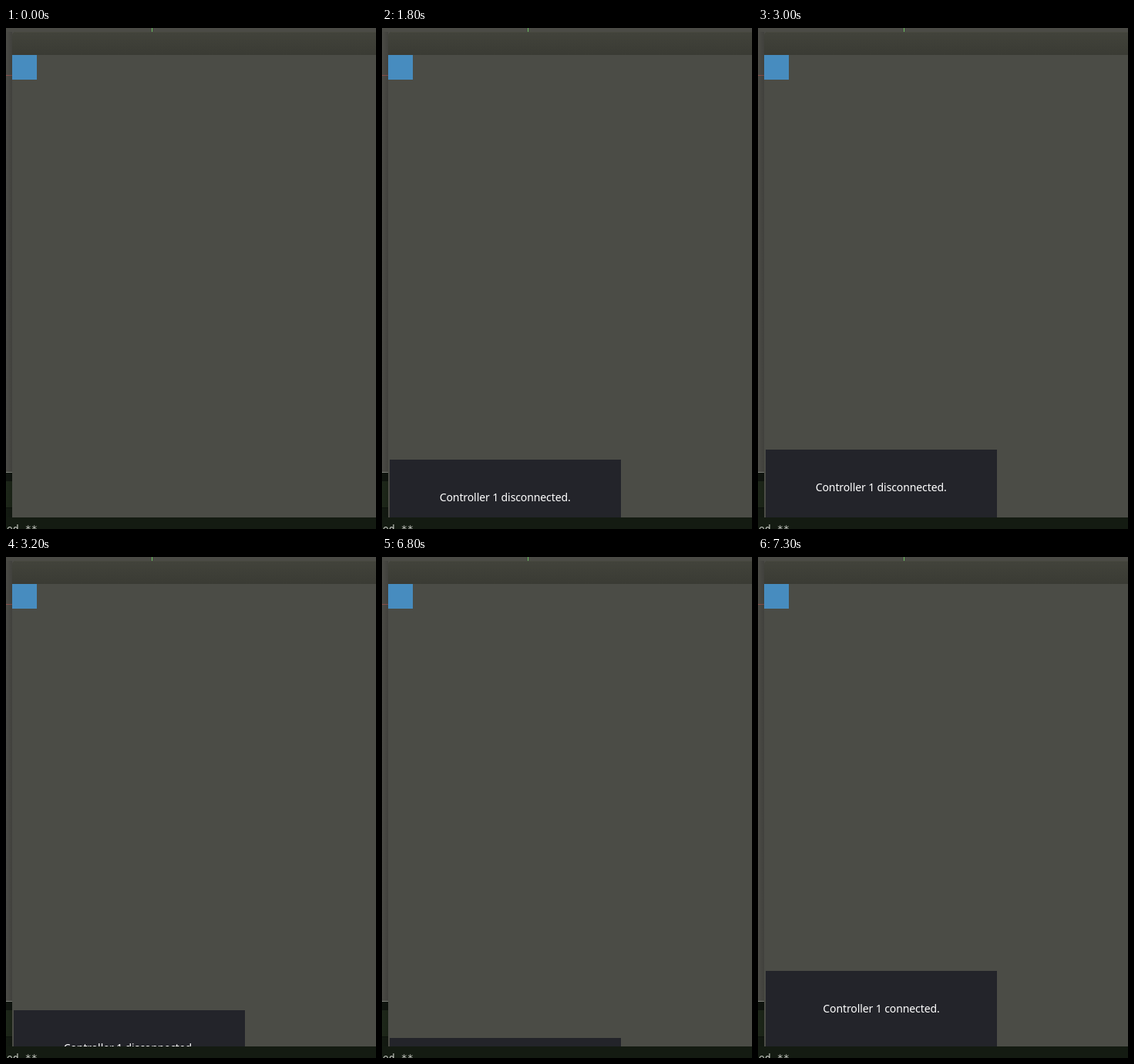
Write an HTML page that moves like this. It is 480 px wide and 650 px high and loops after 8000 ms.

```html
<!DOCTYPE html>
<html lang="en">
<head>
<meta charset="utf-8">
<title>Controller notification</title>
<style>
  html, body { margin: 0; width: 100%; height: 100%; overflow: hidden; background: #4b4b46; }
  svg { display: block; }
  .toast { animation: slide 8s step-end infinite; }
  .toast text { font: 14px "Noto Sans", "Open Sans", sans-serif; letter-spacing: -0.1px; fill: #fff; text-anchor: middle; }
  .lost { animation: lost 8s step-end infinite; }
  .found { animation: found 8s step-end infinite; }
  .log { font: 13.3px "DejaVu Sans Mono", monospace; fill: #c4c6c0; white-space: pre; }

  /* Moves about 20px every 100ms, in hard steps */
  @keyframes slide {
    0% { transform: translateY(100px); }
    18.75% { transform: translateY(85px); }
    20% { transform: translateY(65px); }
    21.25% { transform: translateY(44px); }
    22.5% { transform: translateY(23px); }
    23.75% { transform: translateY(3px); }
    25% { transform: translateY(0); }
    37.5% { transform: translateY(10px); }
    38.75% { transform: translateY(30px); }
    40% { transform: translateY(51px); }
    41.25% { transform: translateY(72px); }
    42.5% { transform: translateY(92px); }
    43.75% { transform: translateY(100px); }
    85% { transform: translateY(87px); }
    86.25% { transform: translateY(67px); }
    87.5% { transform: translateY(46px); }
    88.75% { transform: translateY(25px); }
    90% { transform: translateY(5px); }
    91.25%, 100% { transform: translateY(0); }
  }
  @keyframes lost { 0% { opacity: 1; } 60%, 100% { opacity: 0; } }
  @keyframes found { 0% { opacity: 0; } 60%, 100% { opacity: 1; } }
</style>
</head>
<body>
<svg width="480" height="650" viewBox="0 0 480 650">
  <defs>
    <linearGradient id="bar" x2="0" y2="1">
      <stop stop-color="#42433b"/>
      <stop offset="1" stop-color="#3a3b34"/>
    </linearGradient>
    <linearGradient id="shade">
      <stop stop-color="#000" stop-opacity="0"/>
      <stop offset="1" stop-color="#000" stop-opacity=".14"/>
    </linearGradient>
    <clipPath id="view"><rect x="8" y="35" width="472" height="600"/></clipPath>
  </defs>

  <!-- Editor behind the window -->
  <rect width="480" height="650" fill="#4b4b46"/>
  <rect x="189" width="1" height="5" fill="#68c05c"/>
  <rect y="61" width="8" height="1" fill="#8c524c"/>
  <rect y="576" width="8" height="1" fill="#858880"/>
  <rect y="577" width="8" height="11" fill="#10150f"/>
  <rect y="588" width="8" height="34" fill="#1e281a"/>
  <rect y="622" width="480" height="28" fill="#141b12"/>
  <rect y="622" width="8" height="1" fill="#0d120c"/>
  <rect y="5" width="8" height="630" fill="url(#shade)"/>
  <text class="log" x="0.8" y="655">ed **</text>

  <!-- Game window -->
  <path d="M8 35V10q0-5 5-5H480V35Z" fill="url(#bar)"/>
  <path d="M12 5.5H480" stroke="#47483f"/>
  <rect x="8" y="35" width="472" height="600" fill="#4b4c46"/>
  <rect x="8" y="35" width="32" height="32" fill="#478cbf"/>

  <g clip-path="url(#view)">
    <g class="toast">
      <rect x="10" y="537" width="300" height="100" fill="#23242a"/>
      <text class="lost" x="159.7" y="591">Controller 1 disconnected.</text>
      <text class="found" x="160" y="591">Controller 1 connected.</text>
    </g>
  </g>
</svg>
</body>
</html>
```
